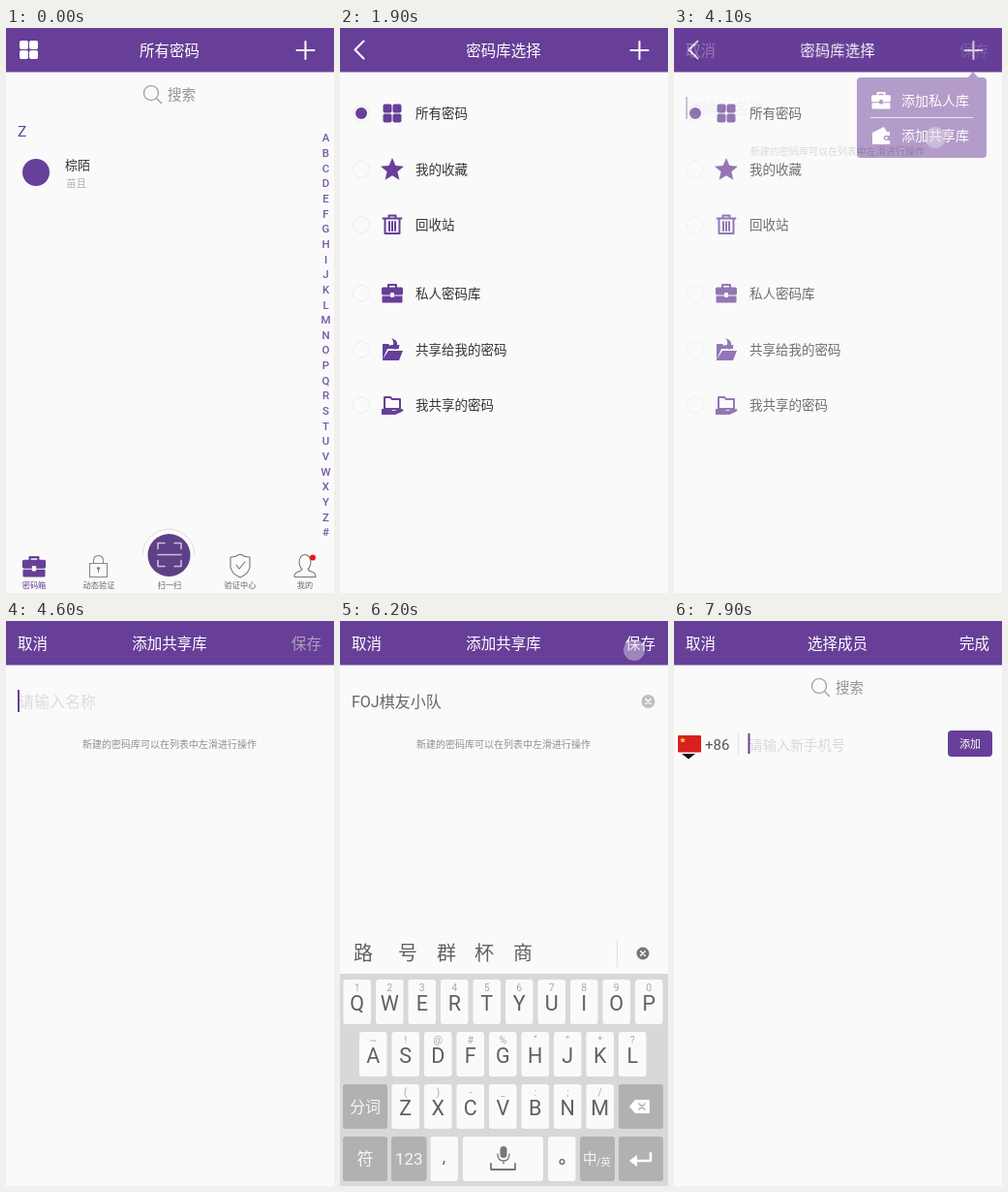
An HTML page that plays this animation: 339 px wide and 583 px high, repeating every 8000 ms.

```html
<!DOCTYPE html>
<html lang="zh-CN">
<head>
<meta charset="utf-8">
<title>密码箱</title>
<style>
  html, body { margin: 0; width: 100%; height: 100%; overflow: hidden; background: #fafafa; }
  svg { display: block; width: 100vw; height: 100vh; }
  text { font-family: Roboto, "Noto Sans CJK SC", "Noto Sans CJK", sans-serif; white-space: pre; }
</style>
</head>
<body>
<svg id="stage" viewBox="0 0 339 583" preserveAspectRatio="none"></svg>
<script>
const LOOP = 8000;
const PURPLE = '#673f98', PAPER = '#fafafa', INK = '#333', KEY_INK = '#606060';

// Drawing helpers; text is placed by its vertical centre.
const text = (x, cy, size, fill, str, anchor = 'start', extra = '') =>
  `<text x="${x}" y="${cy + size * 0.37}" font-size="${size}" fill="${fill}" text-anchor="${anchor}" ${extra}>${str}</text>`;
const rect = (x, y, w, h, fill, r = 0) =>
  `<rect x="${x}" y="${y}" width="${w}" height="${h}" rx="${r}" fill="${fill}"/>`;
const circle = (x, y, r, fill, extra = '') =>
  `<circle cx="${x}" cy="${y}" r="${r}" fill="${fill}" ${extra}/>`;
const line = (d, color, width = 1) =>
  `<path d="${d}" fill="none" stroke="${color}" stroke-width="${width}" stroke-linecap="round" stroke-linejoin="round"/>`;
const shape = (d, fill) => `<path d="${d}" fill="${fill}"/>`;
const at = (x, y, body, scale = 1) => `<g transform="translate(${x} ${y}) scale(${scale})">${body}</g>`;
const group = (id, body) => `<g id="${id}">${body}</g>`;
const touch = (id, x, y) => group(id, circle(x, y, 11, '#d5cddf', 'fill-opacity=".5"'));

// Icons, each centred on 0,0.
const tiles = color => [[-9.5, -9.5], [0.5, -9.5], [-9.5, 0.5], [0.5, 0.5]]
  .map(([x, y]) => rect(x, y, 9, 9, color, 2)).join('');
const briefcase = (color, gap) =>
  line('M-4 -6V-9H4V-6', color, 2) + rect(-11, -6.5, 22, 8, color, 1.5) +
  rect(-10.5, 2.5, 21, 7, color, 1) + rect(-2, -1, 4, 5, gap, 1);
const star = shape('M0 -12L3.4 -4 12 -3.3 5.4 2.3 7.4 10.8 0 6.2 -7.4 10.8 -5.4 2.3 -12 -3.3 -3.4 -4Z', PURPLE);
const bin = line('M-9.5 -6.5H9.5M-3.5 -7V-9.5H3.5V-7', PURPLE, 2) +
  line('M-7.5 -6V9H7.5V-6M-3 -3V6M0 -3V6M3 -3V6', PURPLE, 2);
const inbox = shape('M-10 10V-6H-4L-2 -4H7V-1H-5L-10 10L-4 1H11L7 11H-10Z', PURPLE) +
  shape('M-1 -12Q6 -10 5 -5H8L3 0 -2 -5H1Q2 -9 -1 -12Z', PURPLE);
const handout = line('M-8 4V-8H-2L0 -6H8V4Z', PURPLE, 2) +
  shape('M-11 4H-6Q-2 4 1 6L10 4Q13 5 10 7L3 10H-11Z', PURPLE);
const wallet = shape('M-9 -3L3 -9 6 -4H9V0H4Q1 2 4 5H9V9H-9Z', '#fff') + circle(5.5, 2.5, 1.3, '#fff');
const cross = (r, fill, stroke, arm) =>
  circle(0, 0, r, fill) + line(`M${-arm} ${-arm}L${arm} ${arm}M${arm} ${-arm}L${-arm} ${arm}`, stroke, 1.4);
const lock = line('M-5 -3V-6Q-5 -11 0 -11T5 -6V-3M-9 -3H9V11H-9ZM0 2V6', '#888', 1.1) + circle(0, 2, 1.5, '#777');
const shield = line('M0 -12Q5 -9 10 -9V1Q9 8 0 12Q-9 8 -10 1V-9Q-5 -9 0 -12M-4 -1L-1 3 5 -4', '#777', 1.1);
const person = line('M-3 3Q-6 0 -6 -5Q-5 -12 0 -12T6 -5Q6 0 3 3Q4 5 8 6Q11 7 11 11H-11Q-11 7 -8 6Q-4 5 -3 3Z', '#777', 1.1);
const scan = line('M-12 -6V-12H-5M5 -12H12V-6M12 6V12H5M-5 12H-12V6M-12 0H12', '#c9c1d3', 1.6);
const plus = line('M300.5 23H318.5M309.5 14V32', '#fff', 2);
const back = line('M24.5 13.5L15.5 22.5 24.5 31.5', '#fff', 2);

const page = (title, body) => rect(0, 0, 339, 583, PAPER) + rect(0, 0, 339, 45.5, PURPLE) +
  text(169, 23, 15.5, '#fff', title, 'middle') + body;
const headText = (x, str, fill = '#fff') => text(x, 23, 15.5, fill, str);
const search = line('M156 73L160.5 77.5', '#999', 1.3) +
  circle(150, 67, 7.5, 'none', 'stroke="#999" stroke-width="1.2"') + text(167, 68.5, 14.5, '#939393', '搜索');

function home() {
  const index = [...'ABCDEFGHIJKLMNOPQRSTUVWXYZ#']
    .map((c, i) => text(330.5, 113 + i * 15.66, 11.5, '#7a57a5', c, 'middle', 'font-weight="500"')).join('');
  const tabs = [[29, '密码箱'], [96, '动态验证'], [169, '扫一扫'], [242, '验证中心'], [309, '我的']]
    .map(([x, s], i) => text(x, 575, 8.2, i ? '#666' : PURPLE, s, 'middle')).join('');
  return page('所有密码',
    at(23.5, 22.5, tiles('#fff')) + plus + search +
    text(12, 106, 15.5, PURPLE, 'Z') + circle(31, 149, 14, PURPLE) +
    text(61, 141, 13, INK, '棕陌') + text(62, 160, 10.5, '#b0b0b0', '苗且') + index +
    at(29, 556, briefcase(PURPLE, PAPER), 1.1) + at(95.5, 555.5, lock) + at(242, 555, shield) +
    at(309, 555.5, person) + circle(317, 546.5, 3, '#f01414') +
    line('M141 544A27 27 0 0 1 195 544', '#ddd') + circle(168.5, 544, 22, '#5d4088') +
    at(169, 543.5, scan) + tabs);
}

function vaults() {
  const rows = [
    [88, '所有密码', tiles(PURPLE)], [146, '我的收藏', star], [203, '回收站', bin],
    [274, '私人密码库', briefcase(PURPLE, PAPER)], [332, '共享给我的密码', inbox], [389, '我共享的密码', handout],
  ];
  return page('密码库选择', back + plus + rows.map(([y, label, icon], i) =>
    circle(22, y, 8.5, 'none', 'stroke="#ececec"') + (i ? '' : circle(22, y, 6, PURPLE)) +
    at(54, y, icon) + text(78, y + 0.5, 13.5, INK, label)).join(''));
}

const popup = shape('M303 52L309 45 315 52Z', '#9474b4') + rect(189, 51, 134, 83, '#9474b4', 4) +
  at(214, 75, briefcase('#fff', '#9474b4'), 0.9) + text(235, 75, 14, '#fff', '添加私人库') +
  rect(203, 92, 106, 1, '#e6deee') + at(214, 111, wallet) + text(235, 111, 14, '#fff', '添加共享库');

function keyboard() {
  const key = (x, y, w, label = '', hint = '') => rect(x, y, w, 46, '#fafafa', 3) +
    text(x + w / 2, y + 24, 21.5, KEY_INK, label, 'middle') + text(x + w / 2, y + 8, 10.5, '#aaa', hint, 'middle');
  const dark = (x, y, w, label = '', size = 16) => rect(x, y, w, 46, '#b0b2b2', 3) +
    text(x + w / 2, y + 23, size, '#f6f6f6', label, 'middle');
  const row = (x, y, letters, hints) =>
    [...letters].map((c, i) => key(x + i * 33.5, y, 28.5, c, hints[i])).join('');
  return rect(0, 322, 339, 42, PAPER) + rect(0, 364, 339, 219, '#d8d8d8') +
    row(3.5, 370, 'QWERTYUIOP', '1234567890') + row(20, 424, 'ASDFGHJKL', '~!@#%“”*?') +
    dark(3, 478, 46, '分词') + row(53.5, 478, 'ZXCVBNM', '()-_:;/') + dark(288, 478, 46) +
    shape('M299 501L305 494H320V508H305Z', '#fff') + line('M309 498L315 504M315 498L309 504', '#b0b2b2', 1.6) +
    dark(3, 532, 46, '符', 17) + dark(53, 532, 36.5, '123', 17) + key(93.5, 532, 28.5) +
    text(107.5, 553, 17, KEY_INK, ',', 'middle') + key(127, 532, 83) +
    rect(165.5, 542, 7, 12, '#777', 3.5) + line('M163 550Q163 557 169 557T175 550M169 557V560', '#777', 1.3) +
    line('M156 560V566H181V560', '#777', 1.8) + key(215, 532, 28.5) +
    circle(229.5, 558, 2.4, 'none', 'stroke="#666" stroke-width="1.2"') + dark(248, 532, 36) +
    text(251, 555, 14.5, '#f6f6f6', '中') + text(265, 558, 10.5, '#f6f6f6', '/英') + dark(288, 532, 46) +
    line('M321 549V557H303', '#fff', 2.6) + shape('M299 557L307 551V563Z', '#fff');
}

const candidates = (words, xs, first = KEY_INK) =>
  words.split(' ').map((w, i) => text(xs[i], 343, 20, i ? KEY_INK : first, w)).join('') +
  rect(286, 329, 1, 28, '#e0e0e0');
const clearList = at(313, 343, cross(6.5, '#777', '#fff', 2.3));
const suggestXs = [14, 70, 126, 166, 206];

const addPage = page('添加共享库',
  headText(12, '取消') + group('saveDim', headText(295, '保存', '#ada0ba')) + group('saveOn', headText(295, '保存')) +
  group('nameHint', text(13, 83, 16, '#dcdcdc', '请输入名称')) +
  group('caret', rect(12, 71, 2, 23, PURPLE)) +
  group('name1', text(12, 83, 16, '#666', 'FOJ')) +
  group('name2', text(12, 83, 16, '#666', 'FOJ棋友')) +
  group('name3', text(12, 83, 16, '#666', 'FOJ棋友小队')) +
  group('clear', at(318.5, 83, cross(7, '#c0c0c0', '#fff', 2.6))) +
  text(169, 127.5, 10, '#8e8e8e', '新建的密码库可以在列表中左滑进行操作', 'middle') +
  group('keys', keyboard()) +
  group('typing',
    '<path d="M-1 297H28Q31 297 31 300V321H-1Z" fill="#fafafa" stroke="#ddd"/>' + text(4, 311, 18, KEY_INK, 'foj') +
    candidates('FOJ foj 萝莉 落落 落泪', [14, 76, 118, 178.5, 238], '#ee7650') + line('M310.5 338L315.5 343 310.5 348', '#888', 1.4)) +
  group('list1', candidates('棋友 小队 的 是 吗', suggestXs) + clearList) +
  group('list2', candidates('小队 们 的 会 群', suggestXs) + clearList) +
  group('list3', candidates('路 号 群 杯 商', [14, 60, 100, 139, 179]) + clearList) +
  touch('touchSave', 304, 30));

const members = page('选择成员',
  headText(12, '取消') + headText(295, '完成') + search +
  rect(4, 118, 24, 17.5, '#d8201c', 1) +
  at(9, 123, shape('M0 -3L.9 -1 3 -.9 1.3 .5 1.9 2.6 0 1.4 -1.9 2.6 -1.3 .5 -3 -.9 -.9 -1Z', '#f5d13a')) +
  shape('M8 137H22L15 142.5Z', '#111') + text(32, 127.5, 15, '#555', '+86') + rect(66, 115, 1, 24, '#e4e4e4') +
  text(77.5, 127.5, 14.2, '#d8d8d8', '请输入新手机号') + rect(76.5, 116, 2, 21, PURPLE) +
  rect(283, 113, 46, 27, PURPLE, 4) + text(306, 127, 10.8, '#fff', '添加', 'middle'));

document.getElementById('stage').innerHTML =
  home() + touch('touchMenu', 22, 30) +
  group('vaults', vaults() + touch('touchPlus', 307, 28) + group('popup', popup) + touch('touchShared', 270, 113)) +
  group('add', addPage) + group('members', members);

// Each track lists [ms, value]; values hold until the next stop.
const opacity = v => `opacity:${v}`;
const slide = v => `transform:translateY(${v}px)`;
const during = (from, to) => [[from, 1], [to, 0]];
const fadeIn = start => [0.3, 0.65, 0.92, 1].map((v, i) => [start + i * 100, v]);
const rules = [];
function track(id, stops, css = opacity, initial = 0) {
  const frames = [[0, initial], ...stops, [LOOP, stops.at(-1)[1]]]
    .map(([ms, v]) => `${ms / LOOP * 100}%{${css(v)}}`).join('');
  rules.push(`@keyframes ${id}{${frames}}#${id}{animation:${id} ${LOOP}ms step-end infinite}`);
}

track('touchMenu', during(600, 1800));
track('vaults', fadeIn(1600));
track('touchPlus', during(2600, 3200));
track('popup', [[2700, 0.5], [2800, 1]]);
track('touchShared', during(3400, 4400));
track('add', fadeIn(4100));
track('caret', during(4100, 5000));
track('keys', [[4700, 150], [4800, 55], [4900, 0]], slide, 262);
track('typing', during(5000, 5200));
track('nameHint', [[5200, 0]], opacity, 1);
track('saveDim', [[5200, 0]], opacity, 1);
track('saveOn', [[5200, 1]]);
track('clear', [[5200, 1]]);
track('name1', during(5200, 5700));
track('name2', during(5700, 5900));
track('name3', [[5900, 1]]);
track('list1', during(5200, 5700));
track('list2', during(5700, 5900));
track('list3', [[5900, 1]]);
track('touchSave', [[6200, 1]]);
track('members', fadeIn(7000));

const style = document.createElement('style');
style.textContent = rules.join('\n');
document.head.append(style);
</script>
</body>
</html>
```
